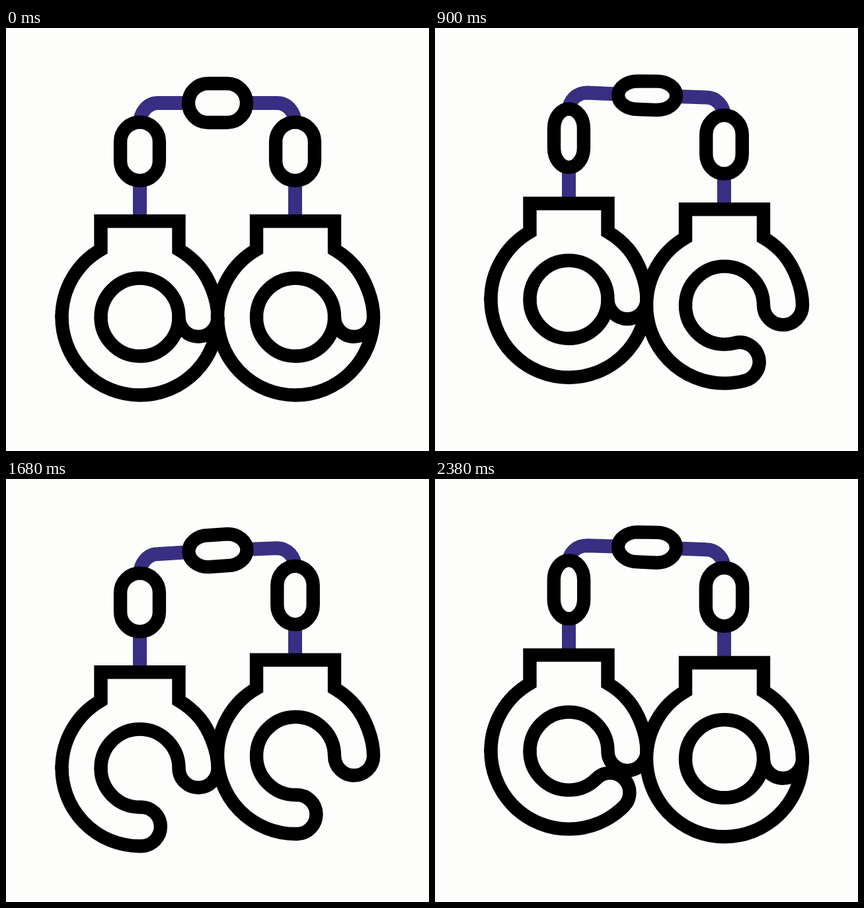
Animation of 640 by 640 pixels, one loop 2400 ms. Source, as an HTML page:

```html
<!DOCTYPE html>
<html lang="en">
<head>
<meta charset="utf-8">
<title>Handcuffs</title>
<style>
  html, body { margin: 0; width: 100%; height: 100%; overflow: hidden; background: #fdfdfc; }
  svg { display: block; width: 100vw; height: 100vh; }
  path, rect { fill: #fdfdfc; stroke: #000; stroke-width: 20.4; }
  .chain { fill: none; stroke: #392f82; stroke-width: 21; }
  .jaw { fill: none; }
  .body { stroke-linecap: round; }
</style>
</head>
<body>
<svg viewBox="0 0 640 640">
  <path id="chain" class="chain"/>
  <path id="topLink"/>
  <rect id="linkL"/>
  <rect id="linkR"/>
  <g id="cuffL"></g>
  <g id="cuffR"></g>
</svg>
<script>
const LOOP = 2400;
const R = 118, r = 59, CAP = (R - r) / 2;
const OPEN = 88.6;
const XL = 202.5, XR = 438, CY = 437.5;

// Tracks: [time, value] with eased steps between
const tracks = {
  liftL: [[370, 0], [740, 29], [771, 29], [1530, 0], [1740, 0], [2130, 29], [2225, 29], [2984, 0]],
  liftR: [[0, 0], [450, 29], [581, 29], [1340, 0], [1412, 0], [1866, 29], [1996, 29], [2755, 0]],
  jawL: [[855, 0], [1385, OPEN], [2065, OPEN], [2705, 0]],
  jawR: [[400, 0], [1067, OPEN], [1800, OPEN], [2440, 0]]
};

const $ = id => document.getElementById(id);
const set = (el, attrs) => { for (const k in attrs) el.setAttribute(k, attrs[k]); };

function valueAt(track, t) {
  const i = track.findIndex(k => k[0] > t);
  if (i <= 0) return track[0][1];
  const [t0, a] = track[i - 1], [t1, b] = track[i];
  const x = (t - t0) / (t1 - t0);
  return a + (b - a) * x * x * (3 - 2 * x);
}

function polar(rad, deg) {
  const a = deg * Math.PI / 180;
  return (rad * Math.cos(a)).toFixed(2) + ' ' + (rad * Math.sin(a)).toFixed(2);
}

const arc = (rad, sweep, to) => `A${rad} ${rad} 0 0 ${sweep} ${to}`;

const body = 'M-118 0' + arc(R, 1, '-59 -102.2') + 'V-145.3H59V-102.2' + arc(R, 1, polar(R, -40)) +
  'C105 -58 118 -27 118 0' + arc(CAP, 1, '59 0') + arc(r, 0, '0 -59') + arc(r, 0, '-59 0');

const jaw = deg => 'M' + polar(R, 182) + arc(R, 0, polar(R, 90)) + arc(R, 0, polar(R, deg)) +
  arc(CAP, 0, polar(r, deg)) + arc(r, 1, polar(r, 90)) + arc(r, 1, polar(r, 182));

for (const id of ['cuffL', 'cuffR']) {
  $(id).innerHTML = `<path class="jaw"/><path class="body" d="${body}"/>`;
}

function drawCuff(id, x, lift, deg) {
  set($(id), { transform: `translate(${x} ${CY - lift})` });
  set($(id).firstChild, { d: jaw(deg) });
}

function drawLink(id, x, rise, shrink) {
  const w = 29.4 - shrink / 2;
  set($(id), { x: x - w, y: 142.5 - rise, width: 2 * w, height: 88.4, rx: w, ry: 29.4 });
}

// Returns the height of the link's centre, where the chain passes through
function drawTopLink(l, q) {
  const tl = 84 + .07 * q - .18 * l, tr = 84 - .04 * q - .1 * l;
  const bl = 143 - .535 * q - .39 * l, br = 143 - .64 * q - .28 * l;
  const ml = (tl + bl) / 2, mr = (tr + br) / 2;
  const k = .55, mix = (a, b) => a + (b - a) * k;
  set($('topLink'), {
    transform: `translate(${(l + q) / 40} 0)`,
    d: `M305.5 ${tl}L334.5 ${tr}C351 ${tr} 364 ${mix(mr, tr)} 364 ${mr}` +
       `C364 ${mix(mr, br)} 351 ${br} 334.5 ${br}L305.5 ${bl}` +
       `C289 ${bl} 276 ${mix(ml, bl)} 276 ${ml}C276 ${mix(ml, tl)} 289 ${tl} 305.5 ${tl}Z`
  });
  return (ml + mr) / 2;
}

function drawChain(l, q, riseL, riseR, mid) {
  const yl = 113.5 - 16.5 * (l / 27) ** 6, yr = 113.5 - .48 * q;
  const sl = 145 - riseL, sr = 145 - riseR, x2 = 437.5;
  set($('chain'), {
    d: `M${XL} ${290 - l}V${sl}C${XL} ${sl - (sl - yl) * .55} 214 ${yl} 230 ${yl}L320 ${mid}` +
       `L410 ${yr}C426 ${yr} ${x2} ${sr - (sr - yr) * .55} ${x2} ${sr}V${290 - q}`
  });
}

function draw(t) {
  const l = valueAt(tracks.liftL, t), q = valueAt(tracks.liftR, t);
  const riseL = .75 * l, riseR = .585 * q;
  drawChain(l, q, riseL, riseR, drawTopLink(l, q));
  drawLink('linkL', XL, riseL, .52 * l);
  drawLink('linkR', 437.5, riseR, .24 * q);
  drawCuff('cuffL', XL, l, valueAt(tracks.jawL, t));
  drawCuff('cuffR', XR, q, valueAt(tracks.jawR, t));
}

function tick() {
  draw(performance.now() % LOOP);
  requestAnimationFrame(tick);
}
tick();
</script>
</body>
</html>
```
